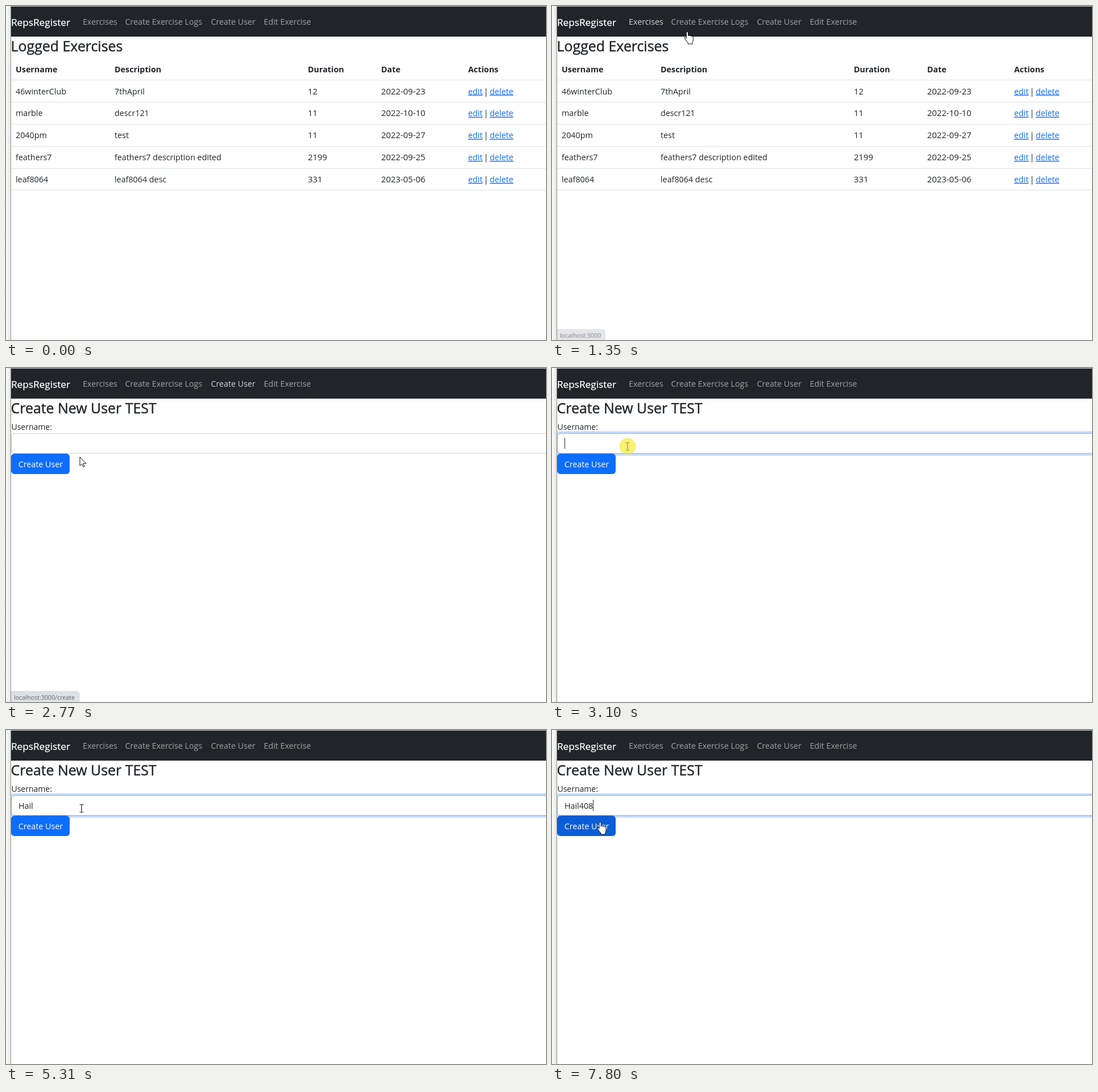
Animation of 950 by 589 pixels, one loop 8000 ms. Source, as an HTML page:

```html
<!DOCTYPE html>
<html lang="en">
<head>
<meta charset="utf-8">
<title>Exercise log</title>
<style>
  html, body { margin: 0; width: 100%; height: 100%; overflow: hidden; background: #fff; }
  svg { display: block; width: 950px; height: 589px; }
  text { font: 14.3px "Open Sans", "Noto Sans", sans-serif; fill: #212529; white-space: pre; }
  .brand { font-size: 17.2px; fill: #fff; stroke: #fff; stroke-width: .25; }
  .nav text { fill: #9fa1a3; }
  .nav .lit { fill: #d3d4d5; }
  .title { font-size: 24.9px; stroke: #212529; stroke-width: .45; }
  .head { font-weight: 700; }
  .num { font-size: 14.9px; }
  .link { fill: #0d6efd; text-decoration: underline; }
  .button { fill: #fff; }
  .status text { font-size: 10.7px; fill: #5f6368; }
  .hand, .arrow { fill: #fff; stroke: #111; stroke-width: 1; stroke-linejoin: round; }
  .beam { fill: none; stroke: #222; stroke-width: 1.2; }
</style>
</head>
<body>
<svg viewBox="0 0 950 589">
  <defs>
    <linearGradient id="edge">
      <stop offset="0" stop-color="#fdfdfd"/>
      <stop offset="1" stop-color="#e3e3e3"/>
    </linearGradient>
    <clipPath id="page"><rect x="9" width="941" height="589"/></clipPath>
  </defs>
  <rect width="950" height="589" fill="#fff"/>

  <g clip-path="url(#page)">
    <rect x="9" y="1" width="941" height="53" fill="#212529"/>
    <rect x="9" width="941" height="1" fill="#c8cbce"/>
    <text class="brand" x="9" y="35">RepsRegister</text>
    <g class="nav" id="nav"></g>

    <g id="list">
      <text class="title" x="8.6" y="79.6">Logged Exercises</text>
      <g id="table"></g>
    </g>

    <g id="form">
      <text class="title" x="8.6" y="79.6">Create New User TEST</text>
      <text x="9.5" y="109" style="font-size:14px">Username:</text>
      <rect id="ring" x="6" y="111.4" width="960" height="43" rx="9" fill="#c2dbfe"/>
      <rect id="input" x="9.5" y="115.5" width="960" height="35" rx="5.5" fill="#fff"/>
      <text id="typed" x="22" y="138.6"></text>
      <rect id="caret" y="123" width="1" height="19.5" fill="#212529"/>
      <rect id="button" x="9" y="151" width="103" height="36" rx="5.7"/>
      <text class="button" x="21.7" y="174.6">Create User</text>
    </g>

    <g class="status" id="status">
      <path id="bubble" fill="#dee1e6" stroke="#cdd0d4" stroke-width=".8"/>
      <text id="address" x="14" y="585"></text>
    </g>
  </g>

  <rect width="8" height="589" fill="url(#edge)"/>
  <rect x="8" width="1" height="589" fill="#929292"/>

  <g id="cursor">
    <path class="arrow" d="M0 0V15.5L3.6 12.2 6 17.6 8.2 16.6 5.8 11.4H10.8Z"/>
    <path class="hand" d="M-2 1a1.6 1.6 0 0 1 3.2 0V7q.3-1.3 1.7-1.2 1.5.1 1.5 1.4 .5-1 1.6-.8 1.4.2 1.4 1.5 .5-.7 1.5-.4 1.2.4 1.2 1.7V14q0 2.5-1.5 4.5V21H1V19Q-1.5 16.5-3.5 13 -5.8 10.4-5 9.6 -4.2 8.8-3 9.8L-2 11Z"/>
    <path class="beam" d="M-3.5-6.5h2.5q1 0 1 1 0-1 1-1h2.5M0-6V6.5M-3.5 7h2.5q1 0 1-1 0 1 1 1h2.5"/>
    <circle id="click" r="14.5" fill="#f4e61c" fill-opacity=".6"/>
  </g>
</svg>

<script>
const LOOP = 8000, HOVER_LAG = 70;
const $ = id => document.getElementById(id);
const show = (el, on) => el.setAttribute('visibility', on ? 'inherit' : 'hidden');

function addText(parent, x, y, content, className = '') {
  const el = document.createElementNS('http://www.w3.org/2000/svg', 'text');
  el.setAttribute('x', x);
  el.setAttribute('y', y);
  el.setAttribute('class', className);
  el.textContent = content;
  parent.append(el);
  return el;
}

function addLine(parent, y) {
  const el = document.createElementNS('http://www.w3.org/2000/svg', 'path');
  el.setAttribute('d', `M9 ${y}H950`);
  el.setAttribute('stroke', '#dee2e6');
  parent.append(el);
}

// Navigation: label, text position and the right edge of its hover area
const links = [
  ['Exercises', 135, 202],
  ['Create Exercise Logs', 209.5, 354],
  ['Create User', 360.5, 447],
  ['Edit Exercise', 453.5, 545]
];
const navItems = links.map(([label, x]) => addText($('nav'), x, 33.4, label));

const columns = [17, 191, 531, 660, 813];
const rows = [
  ['46winterClub', '7thApril', '12', '2022-09-23'],
  ['marble', 'descr121', '11', '2022-10-10'],
  ['2040pm', 'test', '11', '2022-09-27'],
  ['feathers7', 'feathers7 description edited', '2199', '2022-09-25'],
  ['leaf8064', 'leaf8064 desc', '331', '2023-05-06']
];
const table = $('table');
['Username', 'Description', 'Duration', 'Date', 'Actions']
  .forEach((label, i) => addText(table, columns[i], 116.8, label, 'head'));
addLine(table, 130.5);
rows.forEach((row, r) => {
  const y = 155.6 + r * 38.85;
  row.forEach((cell, i) => addText(table, columns[i], y, cell, i > 1 ? 'num' : ''));
  addText(table, columns[4], y, 'edit', 'link');
  addText(table, 840.5, y, '|');
  addText(table, 851, y, 'delete', 'link');
  addLine(table, Math.round(169 + r * 38.85) + .5);
});

// Pointer path: time, x, y
const path = [
  [390, 868, 570], [600, 700, 330], [800, 440, 140], [950, 270, 52], [1080, 206, 17],
  [1145, 206, 17], [1210, 178, 28], [1280, 195, 40], [1350, 238, 46],
  [1550, 300, 38], [1750, 360, 28], [1910, 381, 24],
  [2495, 381, 24], [2560, 362, 28], [2630, 310, 38], [2700, 215, 95], [2770, 130, 157],
  [2890, 130, 157], [3040, 133, 138], [7385, 133, 138], [7800, 85, 163]
];
const statuses = [
  [1270, ':3000', 93], [1420, ':3000/create', 129], [1750, ':3000/user', 119],
  [2640, ':3000/create', 129], [2900, '', 0]
];
const word = 'Hail408';
const keyTimes = [4190, 4520, 4650, 4780, 6500, 6700, 6770];
const caretTimes = [[3060, 3590], [4120, 5310], [5840, 6370], [6500, 7250], [7780, LOOP]];

const within = (t, [from, to]) => t >= from && t < to;

function pointerAt(t) {
  const next = path.findIndex(p => p[0] > t);
  if (next < 0) return path.at(-1).slice(1);
  if (next === 0) return path[0].slice(1);
  const [t0, x0, y0] = path[next - 1], [t1, x1, y1] = path[next];
  const k = (t - t0) / (t1 - t0);
  return [x0 + (x1 - x0) * k, y0 + (y1 - y0) * k];
}

function linkAt([x, y]) {
  return y < 9 || y > 46.5 || x < 128 ? -1 : links.findIndex(link => x < link[2]);
}

function drawStatus(t) {
  const status = statuses.findLast(s => t >= s[0]);
  const visible = status && status[1];
  show($('status'), visible);
  if (!visible) return;
  const [, tail, right] = status;
  $('address').textContent = 'localhost' + tail;
  $('bubble').setAttribute('d', `M9 570.5H${right - 4}q4 0 4 4V590H9Z`);
  $('status').setAttribute('opacity', Math.min(1, .4 + (t - 1270) / 200));
}

function drawForm(t) {
  const focused = t >= 3060;
  show($('ring'), focused);
  $('input').setAttribute('stroke', focused ? '#86b7fe' : '#ced4da');
  $('typed').textContent = word.slice(0, keyTimes.filter(k => t >= k).length);
  show($('caret'), caretTimes.some(span => within(t, span)));
  $('caret').setAttribute('x', Math.round(22 + $('typed').getComputedTextLength()));
}

function drawPointer(t, formOpen) {
  const [x, y] = pointerAt(t);
  const onButton = formOpen && x < 112 && y > 151 && y < 187;
  const onInput = formOpen && y > 115 && y < 151;
  const kind = onButton || linkAt([x, y]) >= 0 ? 'hand' : onInput ? 'beam' : 'arrow';
  const cursor = $('cursor');
  show(cursor, t >= 390);
  cursor.setAttribute('transform', `translate(${x.toFixed(1)} ${y.toFixed(1)})`);
  for (const shape of cursor.querySelectorAll('path')) {
    shape.style.display = shape.classList.contains(kind) ? '' : 'none';
  }
  $('click').style.display = within(t, [2170, 2300]) || within(t, [3040, 3240]) ? '' : 'none';
  $('button').setAttribute('fill', onButton ? '#0b5ed7' : '#0d6efd');
}

function draw(t) {
  const formOpen = t >= 2235;
  show($('list'), !formOpen);
  show($('form'), formOpen);
  if (formOpen) drawForm(t);
  else ['ring', 'caret'].forEach(id => show($(id), false));

  const hovered = t >= 460 ? linkAt(pointerAt(t - HOVER_LAG)) : -1;
  navItems.forEach((item, i) => {
    const clicked = i === 2 && within(t, [2170, 3060]);
    item.classList.toggle('lit', i === hovered || clicked);
  });
  drawStatus(t);
  drawPointer(t, formOpen);
}

const start = performance.now();
function frame() {
  draw((performance.now() - start) % LOOP);
  requestAnimationFrame(frame);
}
frame();
</script>
</body>
</html>
```
